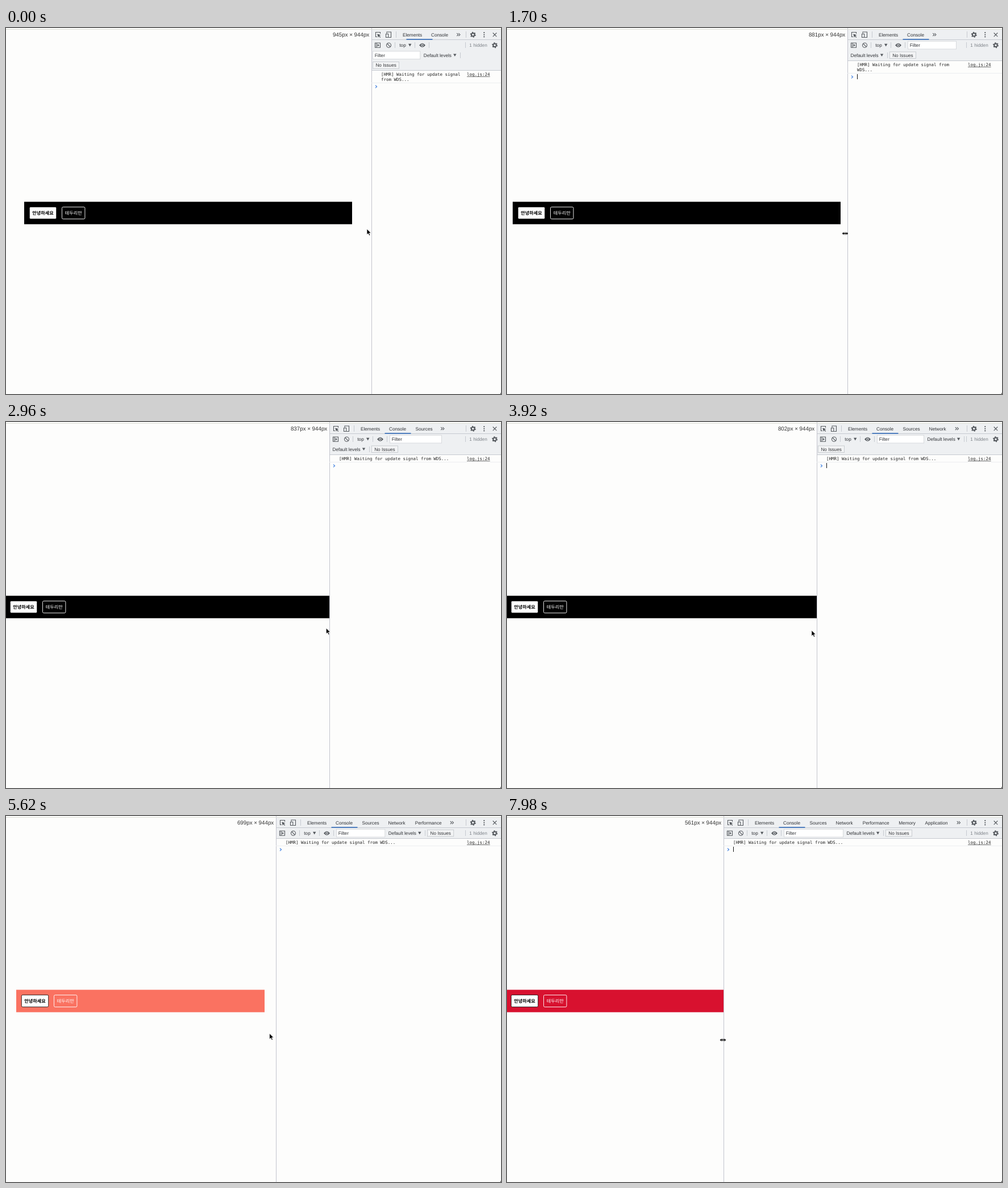
These frames come from a looping animation (871x643 px, 8000 ms). An HTML page:

```html
<!DOCTYPE html>
<html lang="ko">
<head>
<meta charset="utf-8">
<title>Responsive container</title>
<style>
  html, body { margin: 0; width: 100%; height: 100%; overflow: hidden; background: #fdfdfc; }
  svg { display: block; width: 871px; height: 643px; overflow: hidden; }
  text { font: 8.2px "Liberation Sans", Arial, sans-serif; fill: #303236; text-rendering: geometricPrecision; white-space: pre; }
  .mono { font: 7.486px "DejaVu Sans Mono", monospace; fill: #252525; }
  .size { font-size: 9.75px; text-anchor: end; fill: #333; }
  .ko { font: 700 8.17px "Noto Sans CJK KR", "Noto Sans CJK", sans-serif; text-anchor: middle; }
  .line { shape-rendering: crispEdges; }
  .sep { fill: #c6cad0; shape-rendering: crispEdges; }
  .icon { fill: none; stroke: #55595e; stroke-width: 1.1; }
  .solid { fill: #55595e; stroke: none; }
  .box { stroke: #cfd2d6; stroke-width: .8; }
</style>
</head>
<body>
<svg viewBox="0 0 871 643">
  <defs>
    <g id="gear" class="icon">
      <circle r="2.8" stroke-width="2"/>
      <circle r="4.3" stroke-width="1.5" stroke-dasharray="2.1 2.4"/>
    </g>
    <path id="down" class="solid" d="M-2.7-2.2H2.7L0 2.4z"/>
  </defs>

  <rect width="871" height="643" fill="#fdfdfc"/>
  <g id="bar">
    <rect id="fill" y="305.3" height="39.4"/>
    <rect x="9.3" y="314.4" width="47.4" height="21" rx="2" fill="#fff" stroke="#000" stroke-width=".8"/>
    <text class="ko" x="33" y="328" style="fill:#000">안녕하세요</text>
    <rect x="66.5" y="314.5" width="40.4" height="21" rx="2" fill="none" stroke="#fff" stroke-width=".9"/>
    <text class="ko" x="86.8" y="328" style="fill:#fff;font-weight:500">테두리만</text>
  </g>
  <text id="size" class="size" y="15"></text>

  <g id="panel">
    <rect width="900" height="643" fill="#fdfdfc"/>
    <rect id="head" class="line" y="3" width="900" fill="#eef0f2"/>
    <rect class="sep" y="20" width="900" height="1"/>
    <rect id="headLine" class="sep" width="900" height="1"/>
    <rect class="line" width="1" height="643" fill="#c3c4cd"/>

    <path class="icon" d="M15.5 10V7.5H7.5V15.5H10"/>
    <path class="solid" d="M10.3 10.3l6.2 2.2-2.6 1.1 2.3 2.4-.9.9-2.3-2.4-1.1 2.5z"/>
    <path class="icon" d="M27 9.5V7H34.5V16.5H30.5M25.5 10.5H29.8V16.5H25.5z"/>
    <rect class="sep" x="43" y="6" width="1" height="11"/>
    <g id="tabs"></g>
    <rect id="slider" y="19.2" width="46" height="1.6" fill="#2f68b6"/>
    <path id="more" class="icon" d="M-2.7 9.2L-.2 11.7L-2.7 14.2M.4 9.2L2.9 11.7L.4 14.2"/>

    <path class="icon" d="M6.5 26.3H15.5V34.3H6.5zM9 26V34.5"/>
    <path class="solid" d="M10.7 28v4.6l3.3-2.3z"/>
    <path class="icon" d="M27.7 27.5L33.3 33.1M34.5 30.3a4 4 0 1 0-8 0a4 4 0 1 0 8 0z"/>
    <rect class="sep" x="41" y="25" width="1" height="10"/>
    <text x="49.3" y="32.9">top</text>
    <use href="#down" x="67.7" y="30"/>
    <rect class="sep" x="76" y="25" width="1" height="10"/>
    <path class="solid" d="M84 30.2Q89.5 23.2 95 30.2Q89.5 37.2 84 30.2z"/>
    <circle cx="89.5" cy="30.2" r="2.2" fill="#eef0f2"/>
    <circle cx="89.5" cy="30.2" r="1.2" class="solid"/>
    <rect class="sep" x="101" y="25" width="1" height="10"/>

    <g id="filter">
      <rect id="filterBox" class="box" y="-6.8" height="13.8" fill="#fff"/>
      <text x="3.2" y="3.2">Filter</text>
    </g>
    <g id="levels">
      <text y="2.9">Default levels</text>
      <use href="#down" x="55" y="0"/>
      <rect class="sep" x="64" y="-5" width="1" height="10"/>
    </g>
    <g id="issues">
      <rect class="box" x=".4" y="-5.8" width="46.2" height="11.6" fill="#f3f4f5" style="stroke:#bfc3c8"/>
      <text x="5.4" y="2.9">No Issues</text>
    </g>

    <g id="log">
      <text class="mono" x="17" y="10" id="line1"></text>
      <text class="mono" x="17" y="18.8" id="line2"></text>
    </g>
    <g id="prompt">
      <rect class="line" y="-7" width="900" height="1" fill="#eceef0"/>
      <path d="M7-2.4L9.5 0L7 2.4" fill="none" stroke="#3f7fe0" stroke-width="1.2"/>
      <rect id="caret" class="line" x="17" y="-5" width="1" height="9" fill="#111"/>
    </g>
  </g>

  <g id="link">
    <text class="mono" x="811" y="10">log.js:24</text>
    <rect x="811" y="11" width="40.6" height=".7" fill="#333"/>
  </g>
  <rect class="sep" x="809" y="6" width="1" height="11"/>
  <use href="#gear" x="821.7" y="11.8"/>
  <g class="solid"><circle cx="841.3" cy="8.2" r="1.1"/><circle cx="841.3" cy="11.8" r="1.1"/><circle cx="841.3" cy="15.4" r="1.1"/></g>
  <path class="icon" d="M856.7 8.5L863.3 15.1M863.3 8.5L856.7 15.1"/>
  <rect class="sep" x="808" y="25" width="1" height="10"/>
  <text x="815.3" y="32.9" style="fill:#7d8288">1 hidden</text>
  <use href="#gear" x="860" y="30.2"/>
  <rect class="line" y="2" width="871" height="1" fill="#dcded6"/>
  <rect class="line" x="870" y="641" width="1" height="2" fill="#555"/>

  <g id="pointer">
    <path id="arrow" d="M0 0V10.2L2.4 8L4.1 11.8L5.9 11L4.2 7.3H7.4z" fill="#000" stroke="#fff" stroke-width=".8"/>
    <path id="resize" d="M-5.5 0L-2.2-3V-.9H-.7V-2.7H.7V-.9H2.2V-3L5.5 0L2.2 3V.9H.7V2.7H-.7V.9H-2.2V3z" fill="#000" stroke="#fff" stroke-width=".5"/>
  </g>
</svg>
<script>
const LOOP = 8000;
// time, page width, divider x, pointer x, pointer y
const STEPS = [
  [0, 945, 643.5, 635, 353],
  [1700, 881, 599.5, 595, 361],
  [2960, 837, 569.5, 563.3, 362],
  [4880, 768, 522.5, 508.6, 370],
  [4920, 763, 519, 505, 370.5],
  [5620, 699, 475.5, 463.6, 382],
  [5760, 684, 465, 455, 383],
  [6840, 638, 433.5, 427, 386],
  [LOOP, 560, 380.9, 379.2, 393.5]
];
// label, start and end measured from the divider
const TABS = [
  ['Elements', 55, 89], ['Console', 105, 135.5], ['Sources', 151.5, 181.5],
  ['Network', 197.5, 229], ['Performance', 244.7, 292], ['Memory', 308.3, 339],
  ['Application', 354.5, 396]
];
const MESSAGE = '[HMR] Waiting for update signal from WDS...';
const CHAR = 4.507;

const $ = id => document.getElementById(id);
const set = (id, name, value) => $(id).setAttribute(name, value);
const move = (id, x, y = 0) => set(id, 'transform', `translate(${x} ${y})`);
const show = (id, on) => { $(id).style.display = on ? '' : 'none'; };

$('tabs').innerHTML = TABS.map(([label, x]) => `<text x="${x}" y="14.6">${label}</text>`).join('');
const tabNodes = [...$('tabs').children];

function sample(t) {
  const i = STEPS.findIndex(s => s[0] > t);
  const a = STEPS[i - 1], b = STEPS[i];
  const k = (t - a[0]) / (b[0] - a[0]);
  return a.slice(1).map((v, n) => v + (b[n + 1] - v) * k);
}

function drawPage(width, x) {
  const [colour, size] = width > 800 ? ['#000', 577] : width > 600 ? ['#fa7261', 437] : ['#d8112f', 437];
  const left = Math.max(-2, x / 2 - 1.25 - size / 2);
  move('bar', left);
  set('fill', 'fill', colour);
  set('fill', 'width', size);
  $('size').textContent = `${Math.round(width)}px × 944px`;
  set('size', 'x', x - 4.3);
}

function drawTabs(t, x) {
  let end = 0;
  TABS.forEach(([, , right], i) => {
    const fits = x + right <= 780;
    tabNodes[i].style.display = fits ? '' : 'none';
    if (fits) end = right;
  });
  move('more', end + 17.5);
  const rest = (1 - Math.min(1, t / 150)) ** 2;
  set('slider', 'x', 97.5 - 36.5 * rest);
}

// Wraps the filter tools and returns the bottom of the header.
function drawTools(x) {
  const row = n => 30 + 17.7 * n;
  const fitsAll = x <= 492, fitsLevels = x <= 546, fitsFilter = x <= 614;
  const slack = (fitsAll ? 492 : fitsLevels ? 546 : fitsFilter ? 614.5 : 650) - x;
  const filterWidth = 82 + .2 * slack;
  const filterX = fitsFilter ? 106.5 : 2.5;
  move('filter', filterX, row(fitsFilter ? 0 : 1));
  set('filterBox', 'width', filterWidth);

  const ownRow = fitsFilter && !fitsLevels;
  const levelsX = ownRow ? 5.5 : filterX + filterWidth + 6;
  move('levels', levelsX, row(fitsLevels ? 0 : 1));

  const issuesRow = fitsAll ? 0 : fitsFilter ? 1 : 2;
  move('issues', fitsAll || ownRow ? levelsX + 68.3 : 2, row(issuesRow));

  const bottom = Math.round(39 + 17.7 * issuesRow);
  set('head', 'height', bottom - 3);
  set('headLine', 'y', bottom);
  return bottom;
}

function drawConsole(t, x, top) {
  const room = Math.floor((803 - x - 17) / CHAR);
  const cut = MESSAGE.length <= room ? MESSAGE.length : MESSAGE.lastIndexOf(' ', room);
  $('line1').textContent = MESSAGE.slice(0, cut);
  $('line2').textContent = MESSAGE.slice(cut + 1);
  move('log', 0, top);
  move('link', 0, top);
  move('prompt', 0, top + (cut < MESSAGE.length ? 29 : 20));
  const blink = t % 1120;
  show('caret', blink >= 130 && blink < 690);
}

function draw(t) {
  const [width, rawX, px, py] = sample(t);
  const x = Math.floor(rawX) + .5;
  drawPage(width, x);
  move('panel', Math.floor(rawX));
  drawTabs(t, x);
  drawConsole(t, x, drawTools(x));
  const onEdge = rawX - px < 5.5;
  show('resize', onEdge);
  show('arrow', !onEdge);
  move('pointer', px, py);
}

function tick() {
  draw(performance.now() % LOOP);
  requestAnimationFrame(tick);
}
tick();
</script>
</body>
</html>
```
